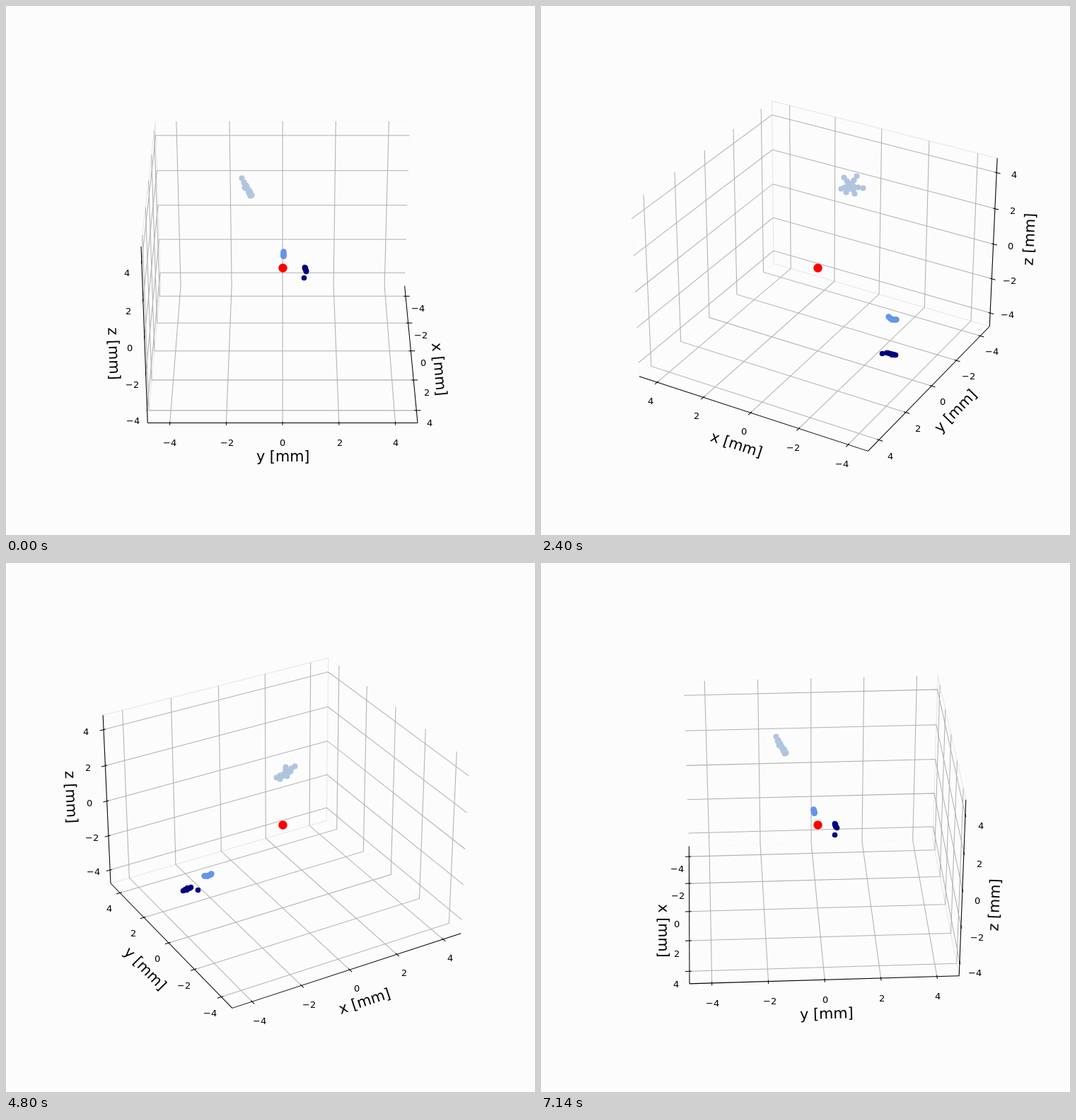
An HTML page with a canvas for the animation above (7200 ms loop, 748 by 748 pixels).

```html
<!DOCTYPE html>
<html lang="en">
<head>
<meta charset="utf-8">
<title>Rotating 3D scatter</title>
<style>
html, body { margin: 0; width: 100%; height: 100%; overflow: hidden; background: #fcfcfc; }
canvas { display: block; }
</style>
</head>
<body>
<canvas id="stage" width="748" height="748"></canvas>
<script>
const ctx = document.getElementById('stage').getContext('2d');
const SIZE = 748, STEP = 60, STEPS = 120;

// Perspective camera: 30 degrees up, distance 10, box proportions 4:4:3
const CX = 391.13, CY = 369.96, ZOOM = 0.77 * SIZE / 0.185, DIST = 10;
const SIN_E = 0.5, COS_E = Math.sqrt(0.75);
const LIMIT = 4.6;                    // axis limit in mm
const EDGE = LIMIT * 25 / 24;         // walls lie a little outside the limit
const DELTA = LIMIT / 6;
const POINT = DELTA * 48 / 887.04;    // rough length of one point in mm
const UNIT_XY = 0.57143 / LIMIT, UNIT_Z = UNIT_XY * 0.75;
const HAIR = 1.04;

const TICKS = [-4, -2, 0, 2, 4];
const AXES = [
  { name: 'x', flip: 1, tickDir: 1, pane: '#fafafa' },
  { name: 'y', flip: 0, tickDir: 0, pane: '#e9e9e9' },
  { name: 'z', flip: 0, tickDir: 0, pane: '#f9f9f9' }
];

// Offsets inside a cluster are in 1/316 of a box unit
const range = (n, f) => Array.from({ length: n }, (_, i) => f(i));

// A star: each arm carries points on the way from the middle to its tip
const star = tips => tips.flatMap(tip => [0.3, 0.6, 1].map(k => tip.map(v => v * k)));

// A short row along x, given by s from -1 to 1
const row = (n, f) => range(n, i => f(2 * i / (n - 1) - 1));

const CLUSTERS = [
  { color: 'lightsteelblue', r: 4, at: [-0.075, -0.159, 0.369],
    pts: star([[-19, -5, -1], [-6, -8, 13], [12, -4, 8], [11, 6, -5], [-9, 2, -9], [4, 4, -10]]) },
  { color: 'cornflowerblue', r: 4.2, at: [-0.388, 0.002, -0.148],
    pts: row(7, s => [6 * s, 0, 2 * s * s - 2]) },
  { color: 'navy', r: 3.8, at: [-0.4415, 0.1067, -0.263],
    pts: [...row(8, s => [7 * s, 0.5 + s, Math.sin(9 * s)]), [16, -2, -6]] },
  { color: 'red', r: 6.2, at: [0, 0, 0], pts: [[0, 0, 0]] }
];

let cosA = 1, sinA = 0;

function projectBox([x, y, z]) {
  const near = x * cosA + y * sinA;
  const side = y * cosA - x * sinA;
  const up = z * COS_E - near * SIN_E;
  const k = ZOOM / (DIST - near * COS_E - z * SIN_E);
  return [CX + side * k, CY - up * k];
}

const project = ([x, y, z]) => projectBox([x * UNIT_XY, y * UNIT_XY, z * UNIT_Z]);

function withValue(p, i, v) {
  const q = p.slice();
  q[i] = v;
  return q;
}

const opposite = (p, i) => withValue(p, i, -p[i]);

function stroke(points, color, width, closed) {
  ctx.beginPath();
  points.forEach(p => ctx.lineTo(...project(p)));
  if (closed) ctx.closePath();
  ctx.strokeStyle = color;
  ctx.lineWidth = width;
  ctx.stroke();
}

function ink(text) {
  const m = ctx.measureText(text);
  return { left: m.actualBoundingBoxLeft, width: m.actualBoundingBoxRight + m.actualBoundingBoxLeft };
}

// Push a point away from the middle on every axis but one
const outward = (p, keep, d) => p.map((v, i) => i === keep ? v : v + (v < 0 ? -d : d));

function drawPane(i, far) {
  const a = (i + 1) % 3, b = (i + 2) % 3;
  const side = opposite(far, a);
  stroke([far, side, opposite(side, b), opposite(far, b)], AXES[i].pane, 1.2, true);
}

function drawGrid(i, far) {
  const a = (i + 1) % 3, b = (i + 2) % 3;
  for (const t of TICKS) {
    const corner = withValue(far, i, t);
    stroke([opposite(corner, a), corner, opposite(corner, b)], '#b0b0b0', HAIR);
  }
}

function drawTitle(i, start, end) {
  const [x0, y0] = project(start), [x1, y1] = project(end);
  let angle = Math.atan2(y1 - y0, x1 - x0);
  if (angle > Math.PI / 2) angle -= Math.PI;
  if (angle <= -Math.PI / 2) angle += Math.PI;
  const [x, y] = project(outward(withValue(start, i, 0), i, 25 * POINT));
  const text = AXES[i].name + ' [mm]';
  ctx.font = '20.78px "DejaVu Sans", sans-serif';
  const { left, width } = ink(text);
  ctx.save();
  ctx.translate(x, y + 0.8);
  ctx.rotate(angle);
  ctx.fillText(text, left - width / 2, 5);
  ctx.restore();
}

function drawTick(i, start, t) {
  const dir = AXES[i].tickDir;
  const at = withValue(start, i, t);
  const shift = k => withValue(at, dir, at[dir] + k * Math.sign(at[dir]) * DELTA);
  stroke([shift(-0.1), shift(0.2)], '#000', HAIR);

  const [x, y] = project(outward(at, i, 11.5 * POINT));
  const text = String(t).replace('-', '\u2212');
  ctx.font = '12.99px "DejaVu Sans", sans-serif';
  ctx.fillText(text, Math.round(x - ink(text).width / 2), Math.round(y + 10.3));
}

function drawAxis(i, far) {
  const start = opposite(far, AXES[i].flip);
  const end = opposite(start, i);
  stroke([start, end], '#000', HAIR);
  ctx.fillStyle = '#000';
  drawTitle(i, start, end);
  TICKS.forEach(t => drawTick(i, start, t));
}

// Markers sit on pixel centres
function drawCluster({ color, r, at, pts }) {
  ctx.fillStyle = color;
  for (const p of pts) {
    const [x, y] = projectBox(p.map((v, i) => at[i] + v / 316));
    ctx.beginPath();
    ctx.arc(Math.round(x) + 0.5, Math.round(y) + 0.5, r, 0, 2 * Math.PI);
    ctx.fill();
  }
}

function draw(step) {
  const azimuth = step * 2 * Math.PI / STEPS;
  cosA = Math.cos(azimuth);
  sinA = Math.sin(azimuth);
  ctx.fillStyle = '#fcfcfc';
  ctx.fillRect(0, 0, SIZE, SIZE);

  const far = [cosA < 0 ? EDGE : -EDGE, sinA < 0 ? EDGE : -EDGE, -EDGE];
  for (const i of [0, 2, 1]) drawPane(i, far);
  for (let i = 0; i < 3; i++) drawGrid(i, far);
  for (let i = 0; i < 3; i++) drawAxis(i, far);
  CLUSTERS.forEach(drawCluster);
}

function tick() {
  draw(Math.floor(performance.now() / STEP) % STEPS);
  requestAnimationFrame(tick);
}
tick();
</script>
</body>
</html>
```
